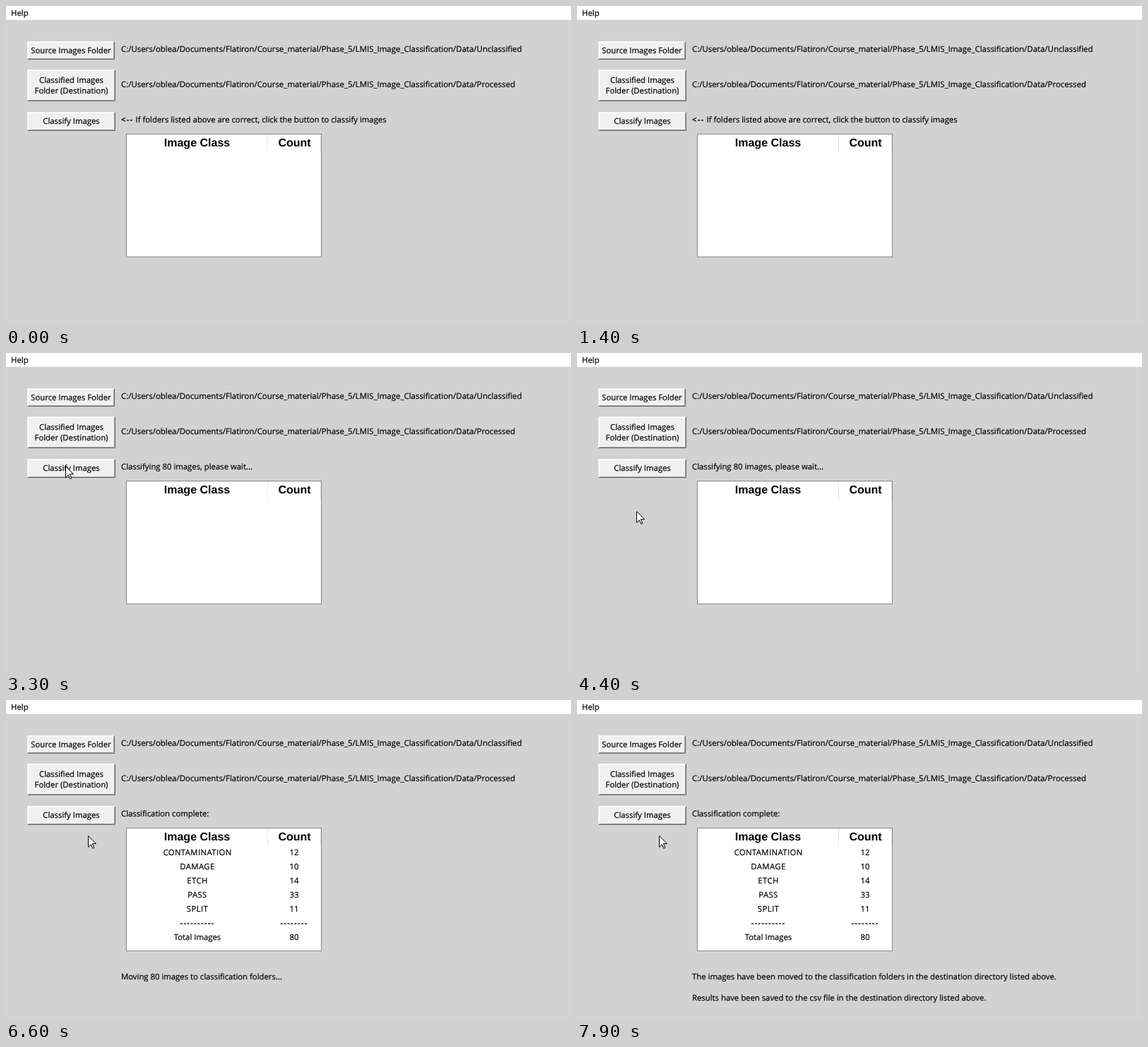
Animation of 800x452 px, one loop 8000 ms. Source, as an HTML page:

```html
<!DOCTYPE html>
<html lang="en">
<head>
<meta charset="utf-8">
<title>Image classifier</title>
<style>
  html, body { margin: 0; width: 100%; height: 100%; overflow: hidden; background: #d2d2d2; }
  svg { display: block; }
  text {
    font: 11.33px "Open Sans", "Noto Sans", sans-serif;
    font-variant-ligatures: none;
    text-rendering: geometricPrecision;
    white-space: pre;
    stroke: #000;
    stroke-width: .2px;
  }
  .mid { text-anchor: middle; }
  .path { font-size: 11.43px; }
  .head { font: bold 16px "Liberation Sans", Arial, sans-serif; stroke: none; }
  .dash { letter-spacing: 1.25px; stroke-width: .4px; }
  .caps { letter-spacing: .4px; }
</style>
</head>
<body>
<svg id="stage" width="800" height="452" viewBox="0 0 800 452"></svg>
<script>
const LOOP = 8000, STEP = 100;
const PRESS = 2900, RELEASE = 3100, RESULTS = 6600, MOVED = 7400;
const stage = document.getElementById('stage');

function add(parent, tag, attrs, content) {
  const node = document.createElementNS('http://www.w3.org/2000/svg', tag);
  for (const key in attrs) node.setAttribute(key, attrs[key]);
  if (content !== undefined) node.textContent = content;
  parent.appendChild(node);
  return node;
}
const rect = (parent, x, y, width, height, fill) => add(parent, 'rect', { x, y, width, height, fill });
const label = (parent, x, y, content, cls = '') => add(parent, 'text', { x, y, class: cls }, content);
const show = (node, on) => node.setAttribute('visibility', on ? 'visible' : 'hidden');

function button(x, y, w, h, lines) {
  const g = add(stage, 'g', {});
  const corner = (inset, flip) => {
    const l = x + inset + .5, t = y + inset + .5, r = x + w - inset - .5, b = y + h - inset - .5;
    return add(g, 'path', { d: flip ? `M${l} ${b}H${r}V${t}` : `M${l} ${b}V${t}H${r}`, fill: 'none' });
  };
  rect(g, x, y, w, h, '#f0f0f0');
  const edges = [corner(0, false), corner(1, false), corner(1, true), corner(0, true)];
  const caption = add(g, 'g', {});
  const middle = Math.floor(y + h / 2) + 4;
  lines.forEach((line, i) =>
    label(caption, x + w / 2, middle + Math.round((i - (lines.length - 1) / 2) * 15), line, 'mid'));
  const raised = ['#f4f4f4', '#ffffff', '#a0a0a0', '#696969'];
  const sunken = ['#a0a0a0', '#696969', '#e3e3e3', '#ffffff'];
  return pressed => {
    edges.forEach((edge, i) => edge.setAttribute('stroke', (pressed ? sunken : raised)[i]));
    caption.setAttribute('transform', pressed ? 'translate(1 1)' : '');
  };
}

// Static window
rect(stage, 0, 0, 800, 452, '#d2d2d2');
rect(stage, 0, 0, 800, 19, '#ffffff');
rect(stage, 0, 19, 800, 1, '#f0f0f0');
label(stage, 7, 14, 'Help', 'path');
button(30, 50, 124, 26, ['Source Images Folder'])(false);
button(30, 90, 125, 45, ['Classified Images', 'Folder (Destination)'])(false);
const pressClassify = button(30, 150, 125, 27, ['Classify Images']);

const root = 'C:/Users/oblea/Documents/Flatiron/Course_material/Phase_5/LMIS_Image_Classification/Data/';
label(stage, 163, 65, root + 'Unclassified', 'path');
label(stage, 163, 115, root + 'Processed', 'path');

add(stage, 'rect', { x: 170.5, y: 181.5, width: 276, height: 174, fill: '#ffffff', stroke: '#828790' });
rect(stage, 370, 182, 1, 25, '#e5e5e5');
rect(stage, 445, 182, 1, 25, '#e1ebf5');
label(stage, 270.5, 199, 'Image Class', 'mid head');
label(stage, 408.5, 199, 'Count', 'mid head');

// Changing text
const hint = label(stage, 163, 165, '');
add(hint, 'tspan', { class: 'dash' }, '<--');
add(hint, 'tspan', {}, ' If folders listed above are correct, click the button to classify images');
const waiting = label(stage, 163, 165, 'Classifying 80 images, please wait...');

const results = add(stage, 'g', {});
label(results, 163, 165, 'Classification complete:');
[
  ['CONTAMINATION', '12'], ['DAMAGE', '10'], ['ETCH', '14'], ['PASS', '33'], ['SPLIT', '11'],
  ['----------', '--------'], ['Total Images', '80']
].forEach(([name, count], i) => {
  const dashes = name[0] === '-', y = Math.round(219.7 + i * 20.1);
  const style = dashes ? ' dash' : name === name.toUpperCase() ? ' caps' : '';
  label(results, 271, y, name, 'mid' + style);
  label(results, 408, y, count, dashes ? 'mid dash' : 'mid');
});

const moving = label(stage, 163, 396, 'Moving 80 images to classification folders...');
const moved = add(stage, 'g', {});
label(moved, 163, 396, 'The images have been moved to the classification folders in the destination directory listed above.');
label(moved, 163, 426, 'Results have been saved to the csv file in the destination directory listed above.');

// Pointer: [time, x, y]
const pointer = add(stage, 'path', {
  d: 'M.5 .5V16.5L4.3 12.8L6.8 18.3L8.8 17.5L6.4 11.6H11.5Z',
  fill: '#ffffff', stroke: '#000000', 'stroke-width': 1
});
const track = [
  [2300, 73, 40], [2400, 77, 110], [2500, 79, 148], [2700, 84, 160],
  [3600, 84, 160], [3800, 84, 224], [6000, 84, 224], [6300, 116, 192]
];
function pointerAt(t) {
  const next = track.findIndex(key => key[0] > t);
  if (next < 0) return track[track.length - 1].slice(1);
  if (next === 0) return null;
  const a = track[next - 1], b = track[next], k = (t - a[0]) / (b[0] - a[0]);
  return [1, 2].map(i => Math.round(a[i] + (b[i] - a[i]) * k));
}

function draw(t) {
  pressClassify(t >= PRESS && t < RELEASE);
  show(hint, t < RELEASE);
  show(waiting, t >= RELEASE && t < RESULTS);
  show(results, t >= RESULTS);
  show(moving, t >= RESULTS && t < MOVED);
  show(moved, t >= MOVED);
  const pos = pointerAt(t);
  show(pointer, pos);
  if (pos) pointer.setAttribute('transform', `translate(${pos})`);
}

let start;
function tick(now) {
  start ??= now;
  const t = (now - start) % LOOP;
  draw(Math.floor(t / STEP) * STEP);
  requestAnimationFrame(tick);
}
draw(0);
requestAnimationFrame(tick);
</script>
</body>
</html>
```
